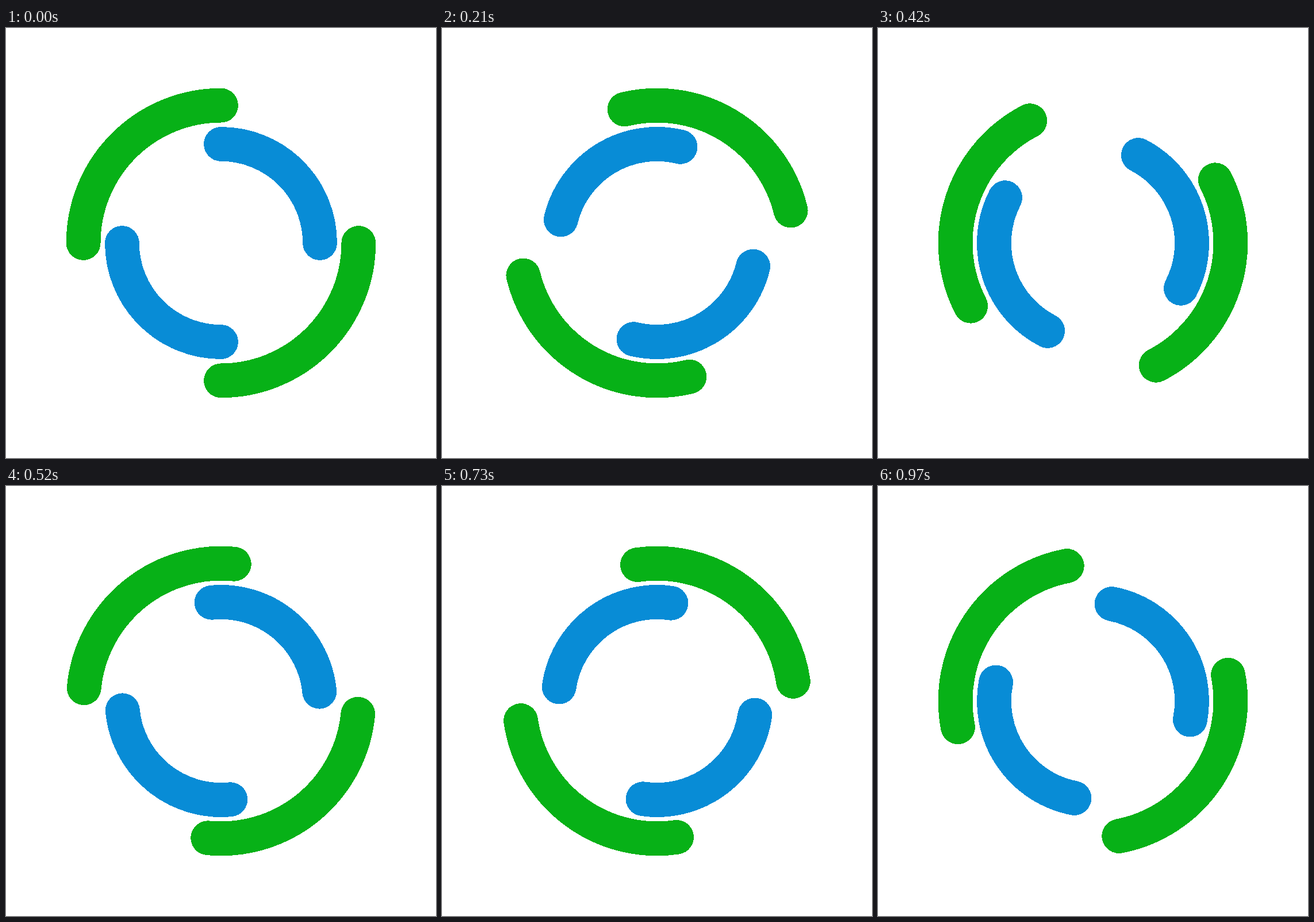
An HTML page that plays this animation: 748 by 748 pixels, repeating every 1 s.

```html
<!DOCTYPE html>
<html lang="en">
<head>
<meta charset="utf-8">
<title>Spinner</title>
<style>
  html, body { margin: 0; width: 100%; height: 100%; overflow: hidden; background: #fff; }
  svg { display: block; width: 100%; height: 100%; }
  path { fill: none; stroke-width: 8; stroke-linecap: round; }
</style>
</head>
<body>
<svg viewBox="-50 -50 100 100" shape-rendering="crispEdges">
  <path id="outer" stroke="#07b117" d="M-32 0A32 32 0 0 1 0-32M32 0A32 32 0 0 1 0 32"/>
  <path id="inner" stroke="#088cd6" d="M0-23A23 23 0 0 1 23 0M0 23A23 23 0 0 1-23 0"/>
</svg>
<script>
  const outer = document.getElementById("outer");
  const inner = document.getElementById("inner");
  const LOOP = 1000, STEPS = 33, TICK = 30;
  const start = performance.now();

  // 30 ms ticks; the middle one lasts 40 ms to fill the second.
  function stepAt(t) {
    return t < 520 ? Math.min(16, Math.floor(t / TICK)) : Math.floor((t - 10) / TICK);
  }

  function draw() {
    const t = (performance.now() - start) % LOOP;
    const angle = stepAt(t) * 360 / STEPS;
    outer.setAttribute("transform", `rotate(${angle})`);
    inner.setAttribute("transform", `rotate(${-angle})`);
    requestAnimationFrame(draw);
  }
  draw();
</script>
</body>
</html>
```
